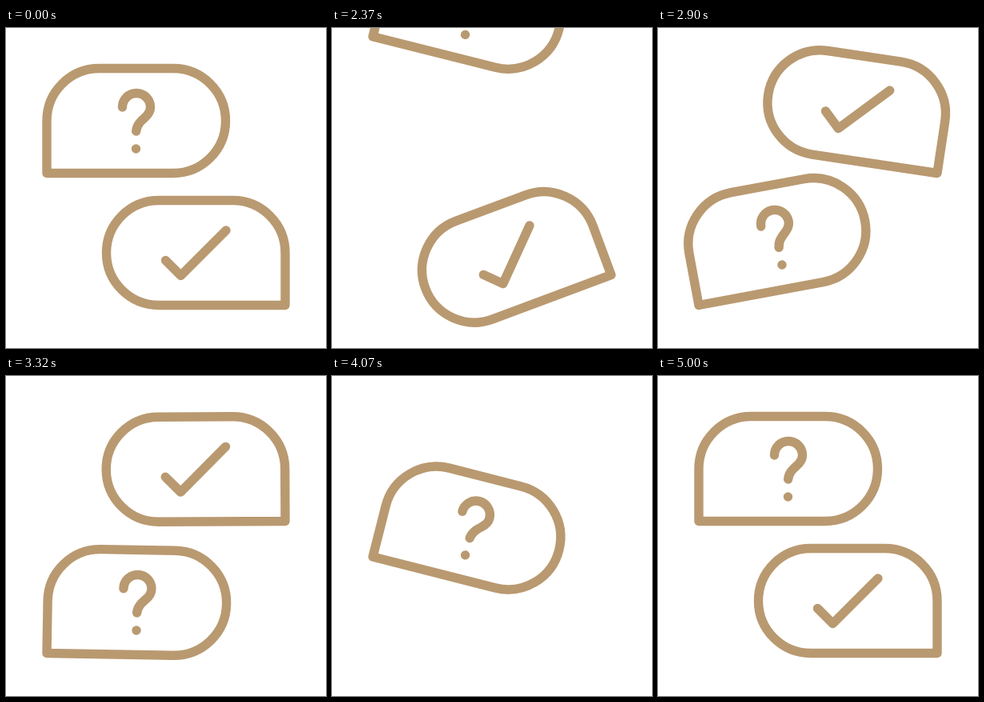
Animation of 400 by 400 pixels, one loop 5020 ms. Source, as an HTML page:

```html
<!DOCTYPE html>
<html lang="en">
<head>
<meta charset="utf-8">
<title>Question and answer</title>
<style>
  html, body { margin: 0; width: 100%; height: 100%; overflow: hidden; background: #fff; }
  svg { display: block; width: 100%; height: 100%; }
</style>
</head>
<body>
<svg viewBox="0 0 400 400" fill="none" stroke="#b99970" stroke-width="11.4" stroke-linecap="round" stroke-linejoin="round">
  <!-- Both bubbles are drawn around their sharp corner, which is the pivot. -->
  <g id="question">
    <path d="M0 0V-65.5A65.5 65.5 0 0 1 65.5 -131H158A65.5 65.5 0 0 1 158 0Z"/>
    <path d="M94.5 -82.5a17.5 17.5 0 0 1 35 0c0 6 -3 9.5 -7 13c-5 4.5 -10 9 -10.8 17M111.5 -30.5h.01"/>
  </g>
  <g id="answer">
    <path d="M0 0V-65.5A65.5 65.5 0 0 0 -65.5 -131H-158A65.5 65.5 0 0 0 -158 0Z"/>
    <path d="M-149.5 -56L-130.5 -37L-74 -93.5"/>
  </g>
</svg>
<script>
const LOOP = 5020, SWAP_1 = 2000, SWAP_2 = 3520;
const TOP = 181.5, BOTTOM = 346.5;

// Tilt keys: [ms since the swap began, degrees]
const LEAVE_TILT = [[0, 0], [600, 21], [625, 21], [790, -13], [1225, 2.3], [1400, 0]];
const RISE_TILT = [[0, 0], [410, 21], [470, 21], [750, -13], [1170, 2.3], [1360, 0]];

const question = document.getElementById('question');
const answer = document.getElementById('answer');

const clamp = x => Math.min(1, Math.max(0, x));
const smooth = x => x * x * (3 - 2 * x);

function tiltAt(keys, t) {
  let value = keys[0][1];
  for (let i = 1; i < keys.length; i++) {
    const [t0, v0] = keys[i - 1], [t1, v1] = keys[i];
    if (t >= t0) value = v0 + (v1 - v0) * smooth(clamp((t - t0) / (t1 - t0)));
  }
  return value;
}

// The upper bubble flies out at the top and comes back from below.
function leave(t) {
  const y = t < 500
    ? TOP - 132 * (t / 330) ** 2.25
    : BOTTOM + 77 * (Math.max(0, 789 - t) / 139) ** 2;
  return { y, tilt: tiltAt(LEAVE_TILT, t) };
}

// The lower bubble climbs to the upper place.
function rise(t) {
  const y = BOTTOM + (TOP - BOTTOM) * smooth(clamp(t / 685) ** 1.9);
  return { y, tilt: tiltAt(RISE_TILT, t) };
}

function place(el, x, { y, tilt }, side) {
  el.setAttribute('transform', `translate(${x} ${y}) rotate(${side * tilt})`);
}

function draw(time) {
  const swapped = time >= SWAP_2;
  const t = time < 2020 ? 0 : time - (swapped ? SWAP_2 : SWAP_1);
  place(question, 51, swapped ? rise(t) : leave(t), 1);
  place(answer, 349, swapped ? leave(t) : rise(t), -1);
}

// The picture steps at 0 and 20 ms of every 50 ms.
const step = ms => Math.floor(ms / 50) * 50 + (ms % 50 >= 20 ? 20 : 0);

const start = performance.now();
function tick() {
  draw(step((performance.now() - start) % LOOP));
  requestAnimationFrame(tick);
}
tick();
</script>
</body>
</html>
```
